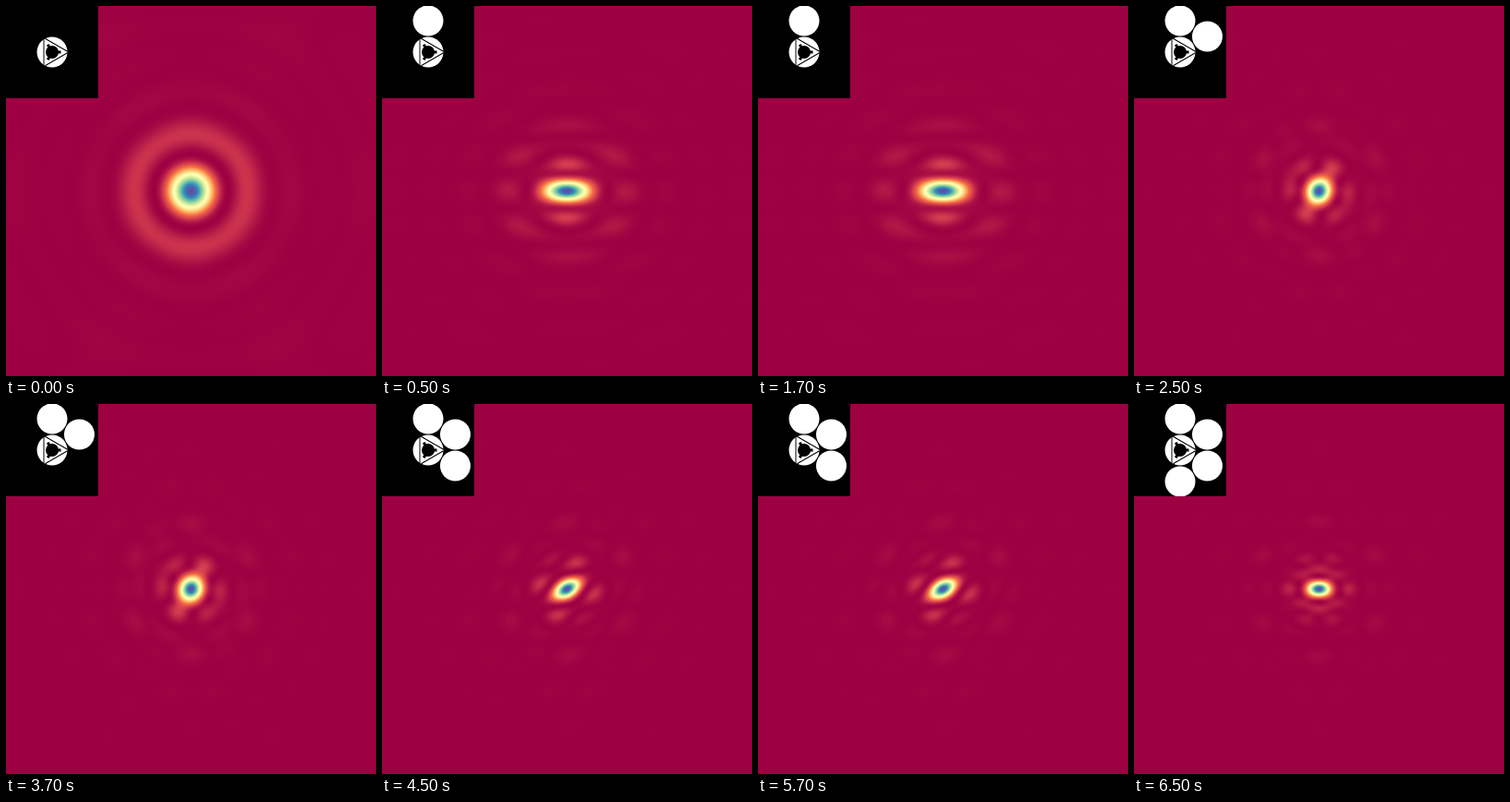
These frames come from a looping animation (401 px wide and 401 px high, 8 s). An HTML page with a canvas:

```html
<!DOCTYPE html>
<html>
<head>
<meta charset="utf-8">
<style>
  html, body { margin: 0; overflow: hidden; background: #9e0142; }
  canvas { display: block; }
</style>
</head>
<body>
<canvas id="stage" width="401" height="401"></canvas>
<script>
// Diffraction pattern of a segmented mirror: the squared Fourier transform of the inset.
const SIZE = 401, MID = 200, INSET = 100, C = 50;
const RADIUS = 16.5, SPACING = 34, FREQ = 0.0048;
const STARTS = [0, 500, 2500, 4500, 6500], LOOP = 8000;
const PALETTE = ['9e0142', 'd53e4f', 'f46d43', 'fdae61', 'fee08b', 'ffffbf',
  'e6f598', 'abdda4', '66c2a5', '3288bd', '5e4fa2']
  .map(h => [0, 2, 4].map(i => parseInt(h.slice(i, i + 2), 16)));

const ctx = document.getElementById('stage').getContext('2d');

function makeCanvas(size) {
  const c = document.createElement('canvas');
  c.width = c.height = size;
  return c.getContext('2d', { willReadFrequently: true });
}

function disc(g, x, y, r, color) {
  g.fillStyle = color;
  g.beginPath();
  g.arc(x, y, r, 0, 2 * Math.PI);
  g.fill();
}

function line(g, x1, y1, x2, y2, width) {
  g.lineWidth = width;
  g.beginPath();
  g.moveTo(x1, y1);
  g.lineTo(x2, y2);
  g.stroke();
}

function drawMirrors(g, outer) {
  g.fillStyle = '#000';
  g.fillRect(0, 0, INSET, INSET);
  for (let i = 0; i < outer; i++) {
    const a = (i * 60 - 90) * Math.PI / 180;
    disc(g, C + SPACING * Math.cos(a), C + SPACING * Math.sin(a), RADIUS, '#fff');
  }
  disc(g, C, C, RADIUS, '#fff');
  disc(g, C, C, 7, '#000');
  for (let i = 0; i < 3; i++) {
    g.save();
    g.translate(C, C);
    g.rotate(i * 2 * Math.PI / 3);
    line(g, -9, -14, -9, 14, 1);
    line(g, 6, 0, 9.5, 0, 3);
    g.restore();
  }
}

function transform(pixels) {
  const cos = [], sin = [];
  for (let u = 0; u < SIZE; u++) {
    cos[u] = new Float64Array(INSET);
    sin[u] = new Float64Array(INSET);
    for (let x = 0; x < INSET; x++) {
      const phase = FREQ * (u - MID) * (x + 0.5 - C);
      cos[u][x] = Math.cos(phase);
      sin[u][x] = Math.sin(phase);
    }
  }
  const power = new Float64Array(SIZE * SIZE);
  const re = new Float64Array(INSET), im = new Float64Array(INSET);
  for (let u = 0; u < SIZE; u++) {
    for (let y = 0; y < INSET; y++) {
      re[y] = im[y] = 0;
      for (let x = 0; x < INSET; x++) {
        const p = pixels[(y * INSET + x) * 4];
        re[y] += p * cos[u][x];
        im[y] += p * sin[u][x];
      }
    }
    // The pattern is point-symmetric, so half the rows are enough.
    for (let v = 0; v <= MID; v++) {
      const cv = cos[v], sv = sin[v];
      let a = 0, b = 0;
      for (let y = 0; y < INSET; y++) {
        a += re[y] * cv[y] - im[y] * sv[y];
        b += re[y] * sv[y] + im[y] * cv[y];
      }
      const i = v * SIZE + u;
      power[i] = power[SIZE * SIZE - 1 - i] = a * a + b * b;
    }
  }
  return power;
}

function makeScene(outer) {
  const inset = makeCanvas(INSET), scene = makeCanvas(SIZE);
  inset.strokeStyle = '#000';
  drawMirrors(inset, outer);
  const power = transform(inset.getImageData(0, 0, INSET, INSET).data);
  const peak = power[MID * SIZE + MID];
  const image = scene.createImageData(SIZE, SIZE);
  power.forEach((p, i) => {
    const t = 10 * p / peak, k = Math.min(9, Math.floor(t));
    for (let c = 0; c < 3; c++) {
      const from = PALETTE[k][c], to = PALETTE[k + 1][c];
      image.data[i * 4 + c] = from + (to - from) * (t - k);
    }
    image.data[i * 4 + 3] = 255;
  });
  scene.putImageData(image, 0, 0);
  scene.drawImage(inset.canvas, 0, 0);
  return scene.canvas;
}

const scenes = STARTS.map((_, i) => makeScene(i));
const begin = performance.now();

function frame() {
  const t = Math.max(0, performance.now() - begin) % LOOP;
  ctx.drawImage(scenes[STARTS.filter(s => s <= t).length - 1], 0, 0);
  requestAnimationFrame(frame);
}
frame();
</script>
</body>
</html>
```
